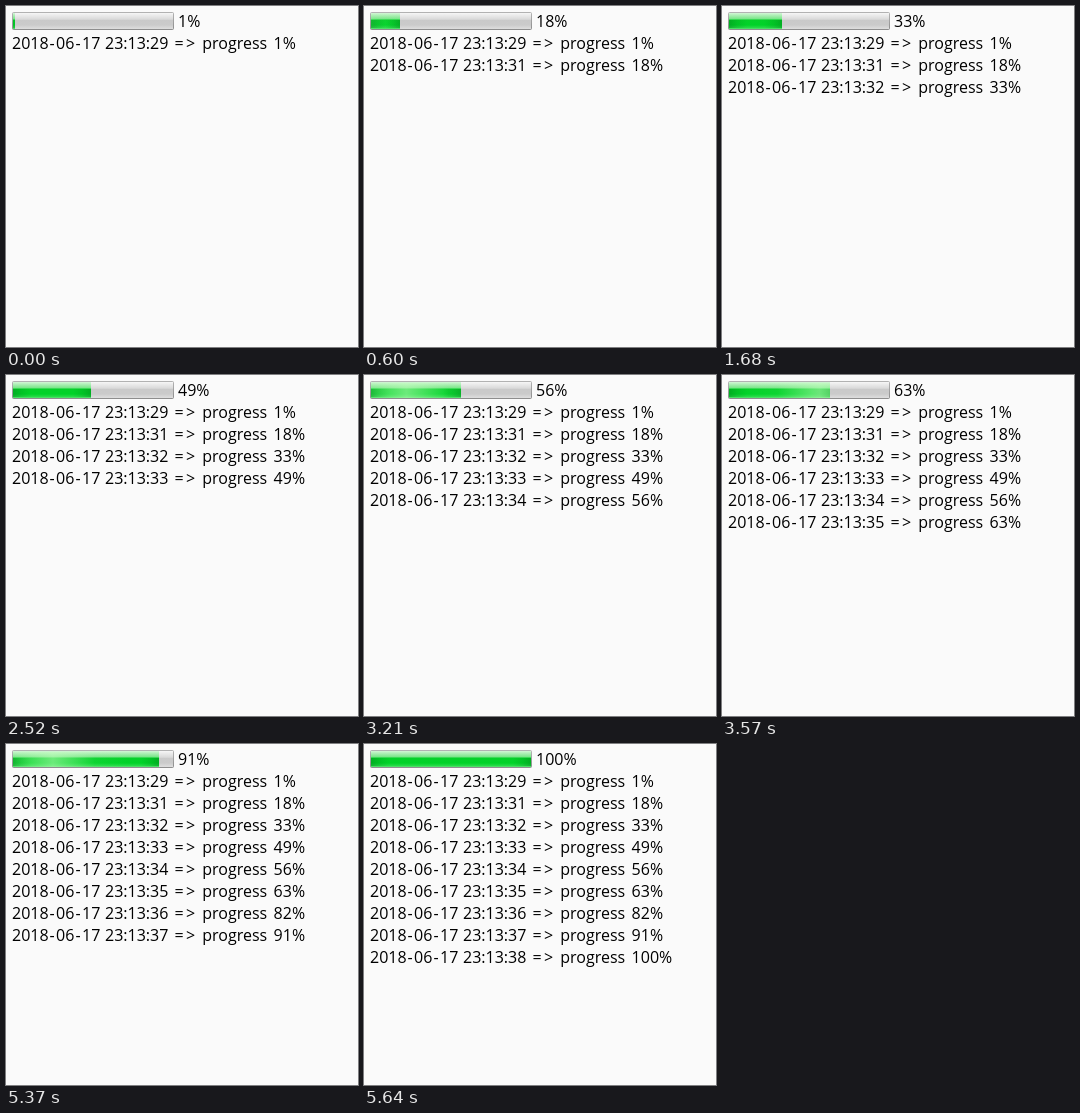
These frames come from a looping animation (352x341 px, 5.94 s). An HTML page with a canvas:

```html
<!DOCTYPE html>
<html lang="en">
<head>
<meta charset="utf-8">
<title>Progress log</title>
<style>
  html, body { margin: 0; width: 100%; height: 100%; overflow: hidden; background: #fafafa; }
  canvas, svg { position: absolute; left: 0; top: 0; }
  text { font: 16px "Open Sans", "Noto Sans", sans-serif; fill: #000; white-space: pre; }
</style>
</head>
<body>
<canvas id="bar" width="352" height="30"></canvas>
<svg id="log" width="352" height="341"></svg>
<script>
const LOOP = 5940;
const STEP = 720, FIRST = -120;             // a new value arrives every STEP ms
const VALUES = [1, 18, 33, 49, 56, 63, 82, 91, 100];
const SECONDS = [29, 31, 32, 33, 34, 35, 36, 37, 38];
const SWEEP = { start: 360, period: 2130, speed: 0.153, width: 150 };
const X = 7, Y = 7, W = 160, H = 16;        // inside of the bar

const log = document.getElementById('log');
const ctx = document.getElementById('bar').getContext('2d');

function addText(y, words) {
  const text = document.createElementNS(log.namespaceURI, 'text');
  text.setAttribute('y', y);
  for (const [x, word] of words) {
    const span = document.createElementNS(log.namespaceURI, 'tspan');
    span.setAttribute('x', x);
    span.textContent = word;
    text.append(span);
  }
  log.append(text);
  return text;
}

const label = addText(21, [[172, '']]).firstChild;
const rows = VALUES.map((value, i) => addText(43 + 22 * i, [
  [6, '2018'], [43.5, '-'], [50, '06'], [69.5, '-'], [76, '17 '],
  [99, `23:13:${SECONDS[i]} `], [168.6, '='], [180, '> '],
  [196.3, 'progress '], [267.6, value + '%']
]));

function gradient(x0, y0, x1, y1, stops) {
  const g = ctx.createLinearGradient(x0, y0, x1, y1);
  for (const [at, color] of stops) g.addColorStop(at, color);
  return g;
}

function box(x, y, w, h, fill) {
  ctx.fillStyle = fill;
  ctx.fillRect(x, y, w, h);
}

const vertical = stops => gradient(0, Y, 0, Y + H, stops);
const trackFill = vertical([[0, '#f6f6f6'], [0.12, '#ededed'], [0.4, '#d9d9d9'],
  [0.43, '#c9c9c9'], [0.75, '#cbcbcb'], [1, '#dedede']]);
const greenFill = vertical([[0, '#d3f5d6'], [0.12, '#b4f0bb'], [0.38, '#77e486'],
  [0.43, '#05d02a'], [0.75, '#00d328'], [0.94, '#2bdc4b'], [1, '#6ce580']]);
const borderFill = vertical([[0, '#b2b2b2'], [1, '#8e8e8e']]);

function shade(x0, x1) {
  const color = a => `rgba(0,130,25,${a})`;
  box(Math.min(x0, x1), Y + 7, Math.abs(x1 - x0), 8,
    gradient(x0, 0, x1, 0, [[0, color(0.45)], [0.45, color(0.2)], [1, color(0)]]));
}

function drawGlint(t) {
  if (t < SWEEP.start) return;
  const age = (t - SWEEP.start) % SWEEP.period;
  const head = X + SWEEP.speed * age, tail = head - SWEEP.width;
  const color = a => `rgba(195,255,190,${a})`;
  box(tail, Y + 1, SWEEP.width, H - 1, gradient(tail, 0, head, 0,
    [[0, color(0)], [0.22, color(0.06)], [0.5, color(0.55)], [0.78, color(0.06)], [1, color(0)]]));
}

function drawBar(value, t) {
  const fill = Math.round(W * value / 100);
  ctx.clearRect(0, 0, 352, 30);
  ctx.beginPath();
  ctx.roundRect(X - 1, Y - 1, W + 2, H + 2, 2);
  ctx.fillStyle = borderFill;
  ctx.fill();
  box(X, Y, W, H, trackFill);

  ctx.save();
  ctx.beginPath();
  ctx.rect(X, Y, fill, H);
  ctx.clip();
  box(X, Y, fill, H, greenFill);
  const reach = Math.min(18, fill / 2);
  shade(X, X + reach);
  shade(X + fill, X + fill - reach);
  if (value < 100) drawGlint(t);
  ctx.restore();
}

function draw(now) {
  const t = now % LOOP;
  const current = Math.min(VALUES.length - 1, Math.floor((t - FIRST) / STEP));
  label.textContent = VALUES[current] + '%';
  rows.forEach((row, i) => row.style.display = i <= current ? '' : 'none');
  drawBar(VALUES[current], t);
}

const begin = performance.now();
function tick() {
  draw(performance.now() - begin);
  requestAnimationFrame(tick);
}
tick();
</script>
</body>
</html>
```
